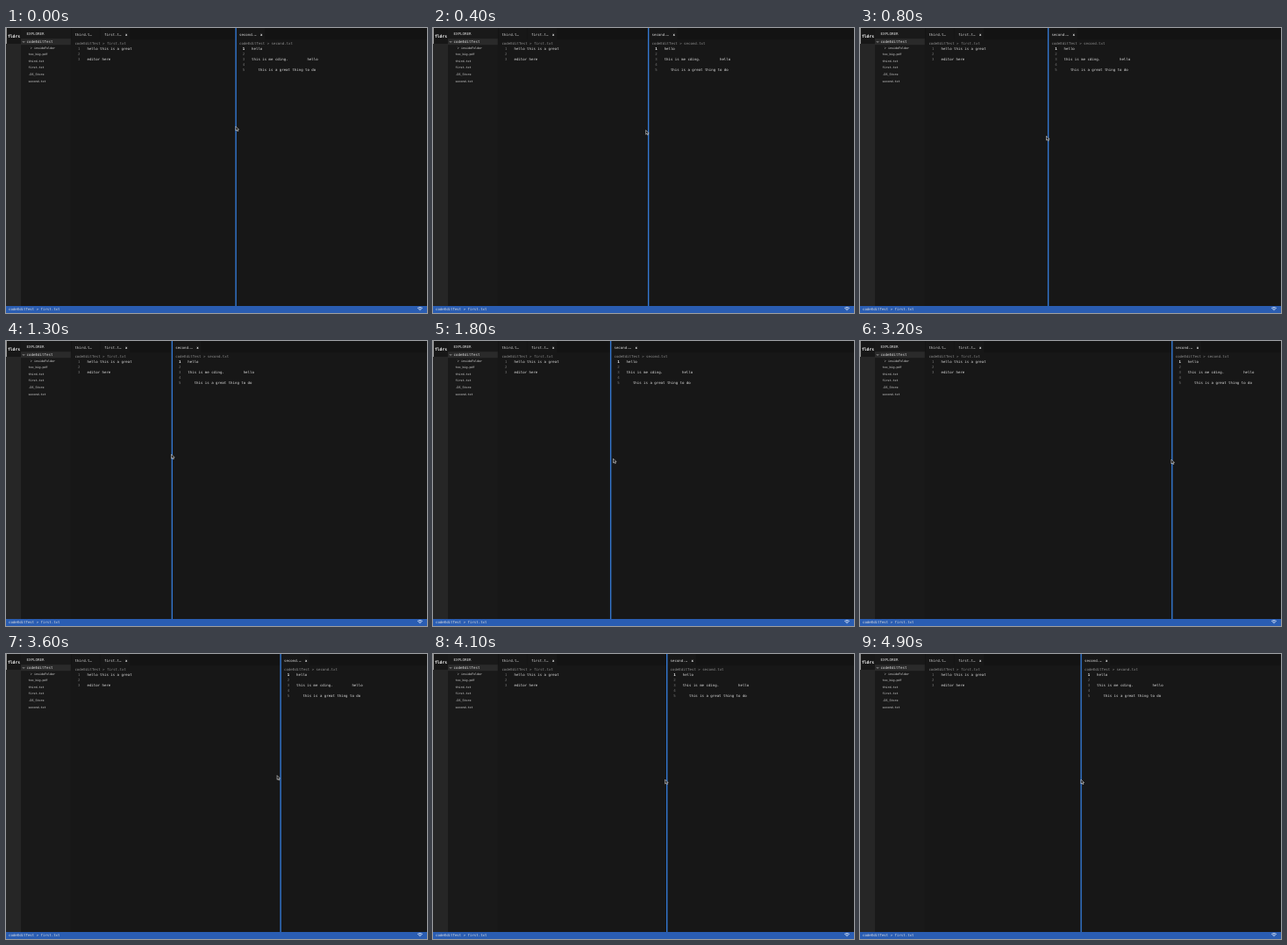
An HTML page that plays this animation: 480x325 px, repeating every 5 s.

```html
<!DOCTYPE html>
<html lang="en">
<head>
<meta charset="utf-8">
<title>Split editor</title>
<style>
  html, body { margin: 0; width: 100%; height: 100%; overflow: hidden; background: #171717; }
  svg { display: block; width: 100vw; height: 100vh; }
  text {
    font: 4.06px "DejaVu Sans Mono", "Noto Sans Mono", monospace;
    fill: #dedede; white-space: pre; text-rendering: geometricPrecision;
  }
  .dim { fill: #8f8f8f; }
  .num { fill: #777; }
  .on { fill: #fff; font-weight: bold; }
  .head { font-size: 4.15px; }
  .file { font-size: 3.32px; fill: #e4e4e4; }
  .logo { font-size: 4.65px; font-weight: bold; fill: #fff; }
</style>
</head>
<body>
<svg id="stage" viewBox="0 0 480 325" preserveAspectRatio="none">
  <rect width="480" height="325" fill="#171717"/>
  <rect width="17" height="317" fill="#262626"/>
  <rect width="17" height="18" fill="#171717"/>
  <rect width=".8" height="18" fill="#b5b5b5"/>
  <rect x="17" width="56.8" height="317" fill="#191919"/>
  <rect x="17" y="12.2" width="56.8" height="7" fill="#2a2a2a"/>
  <g id="side"></g>
  <path d="M18.9 15.1l1.2 1.3 1.2-1.3" fill="none" stroke="#ddd" stroke-width=".6"/>
  <path d="M28.2 21.8l1 1-1 1" fill="none" stroke="#ddd" stroke-width=".5"/>
  <g id="left" transform="translate(74.4 0)"></g>
  <g id="right"></g>
  <rect id="bar" width="1.4" height="317" fill="#3478d2"/>
  <rect y="317" width="480" height="8" fill="#2a5db2"/>
  <text x="3" y="322.3" fill="#fff">codeEditTest &gt; first.txt</text>
  <g fill="none" stroke="#e6eefb" stroke-width=".75">
    <path d="M469.1 319.5q2.9-2.4 5.8 0M470.3 320.7q1.7-1.4 3.4 0"/>
    <circle cx="472" cy="321.8" r=".25"/>
  </g>
  <path id="mouse" d="M0 0V4.8L1.1 3.8 1.9 5.5 2.8 5.1 2 3.5H3.5Z" fill="#111" stroke="#f4f4f4" stroke-width=".55"/>
</svg>
<script>
const NS = "http://www.w3.org/2000/svg";
const el = id => document.getElementById(id);

function add(parent, tag, attrs, content = "") {
  const node = document.createElementNS(NS, tag);
  for (const key in attrs) node.setAttribute(key, attrs[key]);
  node.textContent = content;
  parent.appendChild(node);
}
const label = (parent, x, y, content, cls = "") =>
  add(parent, "text", { x, y, class: cls }, content);

function pane(g, tabs, file, lines, active) {
  add(g, "rect", { width: 480, height: 13, fill: "#131313" });
  tabs.forEach((name, i) => {
    add(g, "rect", { x: i * 33.6, width: 33.2, height: 13, fill: "#171717" });
    label(g, 4 + i * 33.6, 8.9, name);
  });
  label(g, 28 + (tabs.length - 1) * 33.6, 8.9, "x", "on");
  label(g, 4, 18.6, "codeEditTest > " + file, "dim");
  lines.forEach((line, i) => {
    const y = 25 + i * 6.07;
    label(g, 7.7, y, i + 1, i + 1 === active ? "on" : "num");
    label(g, 18.1, y, line);
  });
}

const side = el("side");
label(side, 2, 10.7, "fldrs", "logo");
label(side, 23.5, 7.7, "EXPLORER", "head");
label(side, 23.5, 17.2, "codeEditTest", "head");
label(side, 32, 24, "insideFolder", "file");
["too_big.pdf", "third.txt", "first.txt", ".DS_Store", "second.txt"]
  .forEach((name, i) => label(side, 25.5, 31 + i * 7.72, name, "file"));

pane(el("left"), ["third.t…", "first.t…"], "first.txt",
  ["hello this is a great", "", "editor here"]);
pane(el("right"), ["second.…"], "second.txt",
  ["hello", "", "this is me cding." + " ".repeat(9) + "hello", "",
   "   this is a great thing to do"], 1);

// Key points: [time, value]
const split = [[0, 262], [200, 261], [450, 241], [700, 221.5], [800, 214.5],
  [1100, 196], [1400, 188], [1600, 190.5], [1800, 202.5], [1900, 215.5],
  [2200, 271], [2500, 314], [2800, 342], [3100, 356], [3200, 355.7],
  [3450, 332], [3700, 301], [4100, 266.6], [4300, 256], [4500, 252.6],
  [4700, 252], [5100, 252]];
const height = [[0, 112.3], [800, 123.2], [1800, 134.2], [2500, 138.2],
  [3200, 135.2], [4100, 143.2], [4700, 143.2], [5100, 143.2]];

// Smooth curve through the key points, flat at turning points
function curve(keys, t) {
  const last = keys.length - 1;
  const rate = i => (keys[i + 1][1] - keys[i][1]) / (keys[i + 1][0] - keys[i][0]);
  const slope = i => {
    if (i === 0 || i === last) return 0;
    const a = rate(i - 1), b = rate(i);
    return a * b <= 0 ? 0 : 2 * a * b / (a + b);
  };
  let i = 0;
  while (i < last - 1 && t >= keys[i + 1][0]) i++;
  const [t0, a] = keys[i], [t1, b] = keys[i + 1];
  const d = t1 - t0, u = (t - t0) / d, v = 1 - u;
  return a * v * v * (1 + 2 * u) + b * u * u * (3 - 2 * u)
    + d * u * v * (v * slope(i) - u * slope(i + 1));
}

function draw(ms) {
  const step = Math.floor(ms % 5000 / 100) * 100;
  const t = step < 200 ? 0 : step;
  const x = curve(split, t);
  const tip = curve(split, t + 30);
  el("right").setAttribute("transform", `translate(${x} 0)`);
  el("bar").setAttribute("x", x - 0.6);
  el("mouse").setAttribute("transform", `translate(${tip} ${curve(height, t)})`);
}

const start = performance.now();
function tick() {
  draw(performance.now() - start);
  requestAnimationFrame(tick);
}
tick();
</script>
</body>
</html>
```
